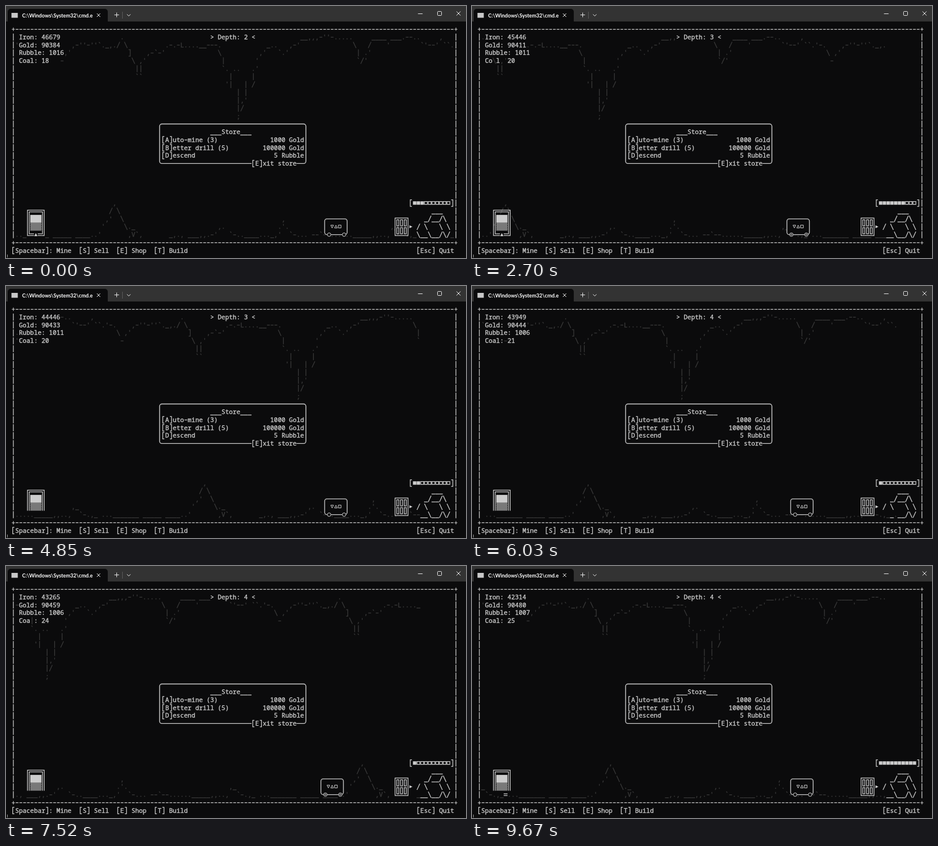
Animation of 800x439 px, one loop 9.7 s. Source, as an HTML page with a canvas:

```html
<!DOCTYPE html>
<html lang="en">
<head>
<meta charset="utf-8">
<title>Mine</title>
<style>
html, body { margin: 0; width: 100%; height: 100%; overflow: hidden; background: #0b0b0c; }
canvas { display: block; }
</style>
</head>
<body>
<canvas id="stage" width="800" height="439"></canvas>
<script>
const ctx = document.getElementById("stage").getContext("2d");
const LOOP = 9700, CELL_W = 6.523, CELL_H = 13.77, PERIOD = 109;
const BACK = "#0b0b0c", TEXT = "#cccccc", DIM = "#3a3a3a";
const left = col => 9.5 + col * CELL_W;
const midX = col => left(col + 0.5);
const midY = row => 40.3 + row * CELL_H;

// Cave strips: row, column, characters
const CEILING = [
  [1, 5, ","], [1, 29, "."], [1, 77, "__,,,-''-....."], [1, 96, "____ ___.--.."],
  [2, 0, "`'--' ``.'-."], [2, 16, ",-''-''`._,./ \\"], [2, 41, ".-.-L....__---."],
  [2, 68, "_..   ,-'"], [2, 91, "\\   /    '"],
  [3, 12, "\\ ,'"], [3, 31, "]    ,-`-'"], [3, 55, "\\"], [3, 66, ",'   `.'"], [3, 92, "| .'"],
  [4, 13, "-"], [4, 32, "\\ ,'"], [4, 56, "|        '"], [4, 92, "`/'"],
  [5, 33, "||"], [5, 56, "`. ..   .'"],
  [6, 33, "``"], [6, 58, "|     |"],
  [7, 57, "'|   | /"], [8, 60, "| |"], [9, 60, "|,'"], [10, 60, "|/"], [11, 60, ";"]
];
const FLOOR = [
  [22, 35, ","], [23, 34, "/ \\"], [24, 33, ",'  \\"], [24, 80, ","],
  [25, 0, ",_"], [25, 32, "'     \\._"], [25, 63, ",."], [25, 79, ".'."],
  [26, 2, "`-.,_ ..._______ _____ ____..'"], [26, 39, ",V`,"], [26, 50, "_,., ___,,.-'"],
  [26, 66, "`-..____..._,'"], [26, 82, "`-... --`--......_____,,..,"]
];
const ROCKS = [[23, 112, "___"], [24, 110, "_/__/\\"], [25, 108, "/ \\   \\ \\"], [26, 108, "\\__\\__/\\/"]];

// time, iron, gold, coal, drill progress
const STATS = [
  [0, 46679, 90384, 18, 3], [1910, 45763, 90404, 20, 24], [3360, 45129, 90418, 20, 34],
  [4850, 44446, 90433, 20, 46], [6030, 43949, 90444, 21, 56], [7520, 43265, 90459, 24, 67],
  [9670, 42314, 90480, 25, 87], [9700, 42314, 90480, 25, 87]
];
const DESCENTS = [1780, 5830];
const SCROLL = [[0, 0], [1780, 53], [1780, 0], [3360, 49], [4850, 93], [5830, 122],
  [5830, 0], [7520, 51], [9670, 109], [9700, 110]];

function segment(points, t) {
  let i = points.length - 2;
  while (i && points[i][0] > t) i--;
  const a = points[i], b = points[i + 1];
  return { a, b, u: (t - a[0]) / (b[0] - a[0]) };
}
const mix = (a, b, u) => a + (b - a) * u;

let grid;
function put(row, col, str, color = TEXT, solid = true) {
  [...str].forEach((ch, i) => {
    if (solid || ch !== " ") grid.set(row * 120 + col + i, [ch, color]);
  });
}
function putStrip(strip, offset, edge) {
  for (const [row, col, str] of strip) {
    [...str].forEach((ch, i) => {
      const first = (col + i - offset + 2 * PERIOD) % PERIOD;
      for (const c of [first, first + PERIOD])
        if (c > 0 && c < edge) put(row, c, ch, DIM, false);
    });
  }
}

function line(...pts) {
  ctx.beginPath();
  pts.forEach(([x, y]) => ctx.lineTo(x, y));
  ctx.stroke();
}
function box(x, y, w, h, r = 0) {
  ctx.beginPath();
  ctx.roundRect(x, y, w, h, r);
  ctx.stroke();
}
function block(x, y, w, h, color) {
  ctx.fillStyle = color;
  ctx.fillRect(x, y, w, h);
}
function triangle(x, y, dx, dy, fill) {
  ctx.beginPath();
  ctx.moveTo(x + dx, y + dy);
  ctx.lineTo(x - dx - dy, y - dy - dx);
  ctx.lineTo(x - dx + dy, y - dy + dx);
  ctx.closePath();
  ctx.fillStyle = TEXT;
  fill ? ctx.fill() : ctx.stroke();
}
function bracket(x, y, d) {
  line([x + 1.7 * d, y - 5.6], [x - 1.1 * d, y - 5.6], [x - 1.1 * d, y + 5.8], [x + 1.7 * d, y + 5.8]);
}

// Characters whose size depends on the cell are drawn as shapes
const SHAPES = {
  "-": (x, y) => line([x - 2.4, y + 0.3], [x + 2.4, y + 0.3]),
  "|": (x, y) => line([x, y - 6], [x, y + 6.2]),
  "_": (x, y) => line([x - 3.27, y + 5.4], [x + 3.27, y + 5.4]),
  "/": (x, y) => line([x - 2.5, y + 5.4], [x + 2.5, y - 5.4]),
  "\\": (x, y) => line([x - 2.5, y - 5.4], [x + 2.5, y + 5.4]),
  "[": (x, y) => bracket(x, y, 1),
  "]": (x, y) => bracket(x, y, -1),
  "═": (x, y) => { for (const d of [-1.5, 1.5]) line([x - 3.3, y + d], [x + 3.3, y + d]); },
  "╚": (x, y) => {
    line([x - 1.5, y - 7], [x - 1.5, y + 1.5], [x + 3.3, y + 1.5]);
    line([x + 1.5, y - 7], [x + 1.5, y - 1.5], [x + 3.3, y - 1.5]);
  },
  "╝": (x, y) => {
    line([x + 1.5, y - 7], [x + 1.5, y + 1.5], [x - 3.3, y + 1.5]);
    line([x - 1.5, y - 7], [x - 1.5, y - 1.5], [x - 3.3, y - 1.5]);
  },
  "▲": (x, y) => triangle(x, y, 0, -2.8, true),
  "►": (x, y) => triangle(x, y, 2.6, 0, true),
  "■": (x, y) => block(x - 3, y - 3, 6, 6, TEXT),
  "□": (x, y) => box(x - 2.5, y - 2.5, 5, 5)
};

function drawGrid() {
  ctx.font = "10.87px 'Noto Sans Mono', 'DejaVu Sans Mono', monospace";
  ctx.textAlign = "center";
  for (const [key, [ch, color]] of grid) {
    const x = midX(key % 120), y = midY(Math.floor(key / 120));
    ctx.fillStyle = ctx.strokeStyle = color;
    ctx.lineWidth = SHAPES[ch] ? 1.25 : 0.35;
    if (SHAPES[ch]) { SHAPES[ch](x, y); continue; }
    ctx.fillText(ch, x, y + 3.8);
    ctx.strokeText(ch, x, y + 3.8);
  }
  ctx.strokeStyle = TEXT;
}

function drawWindow() {
  block(0, 0, 800, 439, BACK);
  block(0, 0, 800, 27, "#333333");
  ctx.fillStyle = BACK;
  ctx.beginPath();
  ctx.roundRect(3, 5, 174, 24, [5, 5, 0, 0]);
  ctx.fill();
  block(9.5, 12, 11, 8.5, "#c8c8c8");
  ctx.font = "bold 9.1px Lato, 'Open Sans', sans-serif";
  ctx.textAlign = "left";
  ctx.fillStyle = "#fff";
  ctx.fillText("C:\\Windows\\System32\\cmd.e", 28, 19.5);
  ctx.strokeStyle = "#e6e6e6";
  ctx.lineWidth = 1;
  for (const [x, y, r] of [[161, 16, 3], [787, 13, 3.5]]) {
    line([x - r, y - r], [x + r, y + r]);
    line([x - r, y + r], [x + r, y - r]);
  }
  line([188.5, 15.5], [196.5, 15.5]);
  line([192.5, 11.5], [192.5, 19.5]);
  line([210.5, 14.5], [213.5, 17.5], [216.5, 14.5]);
  line([716.5, 13.5], [724.5, 13.5]);
  box(750.5, 9.5, 7, 7, 1);
  block(202, 10, 1, 12, "#5a5a5a");
  block(2, 433, 1, 5, "#999");
}

function drawFurnace() {
  const bottom = midY(25.5);
  block(left(5), midY(23.5), CELL_W * 3, CELL_H, TEXT);
  block(left(5), midY(24.5), CELL_W * 3, CELL_H, "#6c6c6c");
  ctx.fillStyle = "#a0a0a0";
  for (let y = 0; y < 13; y += 2)
    for (let x = 0; x < 19; x += 2) ctx.fillRect(42 + x + (y / 2) % 2, 378 + y, 1, 1);
  ctx.lineWidth = 1.25;
  for (const d of [-1.5, 1.5])
    line([midX(4) + d, bottom], [midX(4) + d, midY(23) + d],
      [midX(8) - d, midY(23) + d], [midX(8) - d, bottom]);
}

// Double-line lattice of three by two panes
function drawDoor() {
  const x = midX(102) - 1.5, y = midY(24) - 1.5;
  const w = 3 * CELL_W + 3, h = 2 * CELL_H + 3;
  block(x, y, w, h, BACK);
  ctx.lineWidth = 1.25;
  box(x, y, w, h);
  for (let i = 0; i < 3; i++)
    for (let j = 0; j < 2; j++)
      box(midX(102 + i) + 1.5, midY(24 + j) + 1.5, CELL_W - 3, CELL_H - 3);
}

function drawCart(shift) {
  const x = midX(83 + shift), y = midY(24), h = 2 * CELL_H;
  block(x, y, 6 * CELL_W, h, BACK);
  ctx.lineWidth = 1.3;
  box(x, y, 6 * CELL_W, h, 4);
  ctx.lineWidth = 1;
  triangle(x + 13, y + 13.5, 0, 2.4, false);
  triangle(x + 19.6, y + 13.5, 0, -2.4, false);
  box(x + 23.8, y + 11, 4.8, 4.8);
  for (const dx of [7.8, 33.8]) {
    ctx.beginPath();
    ctx.arc(x + dx, y + h, 3.1, 0, 7);
    ctx.fillStyle = BACK;
    ctx.fill();
    ctx.stroke();
    if (shift === -1) {
      ctx.beginPath();
      ctx.arc(x + dx, y + h, 1.3, 0, 7);
      ctx.stroke();
    }
  }
}

function drawStoreBox() {
  ctx.strokeStyle = TEXT;
  ctx.lineWidth = 1.4;
  box(midX(39), midY(12), 39 * CELL_W, 5 * CELL_H, 4);
  block(left(64), midY(17) - 5, 12 * CELL_W, 10, BACK);
}

function draw(t) {
  const { a, b, u } = segment(STATS, t);
  const gold = Math.floor(mix(a[2], b[2], u));
  const iron = Math.round(mix(a[1], b[1], (gold - a[2]) / (b[2] - a[2] || 1)));
  const coal = Math.floor(mix(a[3], b[3], u));
  const filled = Math.floor(mix(a[4], b[4], u)) % 11;
  const depth = 2 + DESCENTS.filter(d => t >= d).length;
  const rubble = 1016 - 5 * (depth - 2) + (t > 8600 ? 1 : 0);
  const s = segment(SCROLL, t);
  const offset = Math.floor(mix(s.a[1], s.b[1], s.u) + 0.15);
  const fresh = offset === 0;
  const saved = (t > 1480 && t < 1980) || (t > 8120 && t < 8620);

  grid = new Map();
  const cave = () => {
    const edge = Math.max(PERIOD, 118 - offset);
    putStrip(CEILING, offset, edge);
    putStrip(FLOOR, fresh ? 8 : offset, edge);
  };
  // Right after a descent the cave lies behind everything
  if (fresh) cave();
  put(4, 2, "Coal: " + coal);
  put(26, 4, "╚═▲═╝");
  ROCKS.forEach(([row, col, str]) => put(row, col, str, TEXT, false));
  if (!fresh) cave();

  put(1, 2, "Iron: " + iron);
  put(2, 2, "Gold: " + gold);
  put(3, 2, "Rubble: " + rubble);
  put(1, 53, `> Depth: ${depth} <`);
  if (saved) put(1, 106, "Game Saved.");
  put(13, 53, "___Store___");
  [["[A]uto-mine (3)", "1000 Gold"], ["[B]etter drill (5)", "100000 Gold"], ["[D]escend", "5 Rubble"]]
    .forEach(([name, price], i) => put(14 + i, 40, name + price.padStart(38 - name.length)));
  put(17, 64, "[E]xit store");
  put(22, 106, "[" + "■".repeat(filled) + "□".repeat(10 - filled) + "]");
  put(25, 106, "►");
  for (const row of [0, 27]) put(row, 0, "+" + "-".repeat(117) + "+");
  for (let row = 1; row < 27; row++) for (const col of [0, 118]) put(row, col, "|");
  put(28, 0, "[Spacebar]: Mine  [S] Sell  [E] Shop  [T] Build");
  put(28, 108, "[Esc] Quit");

  drawWindow();
  drawStoreBox();
  drawGrid();
  drawFurnace();
  drawDoor();
  drawCart([0, -1, -2, -1][Math.floor(t / 300) % 4]);
}

function tick() {
  draw(performance.now() % LOOP);
  requestAnimationFrame(tick);
}
tick();
</script>
</body>
</html>
```
